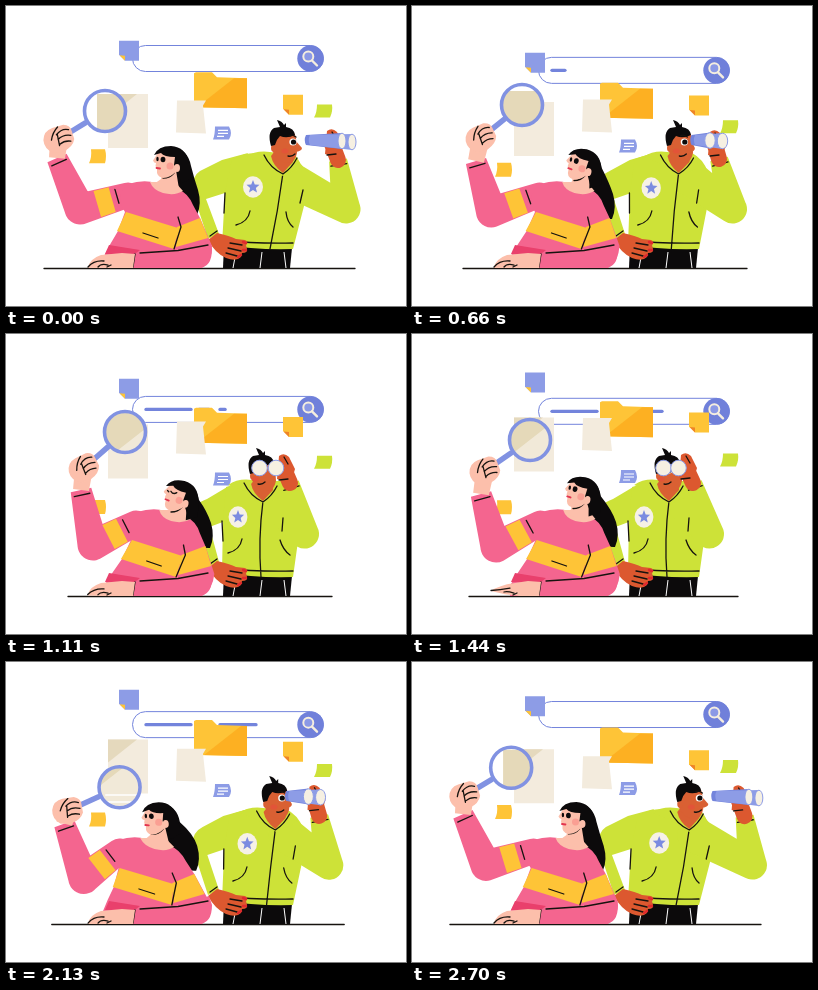
An HTML page for the animation above (2730 ms loop, 400 by 300 pixels).

```html
<!DOCTYPE html>
<html lang="en">
<head>
<meta charset="utf-8">
<title>Search party</title>
<style>
  html, body { margin: 0; width: 100%; height: 100%; overflow: hidden; background: #fff; }
  svg { display: block; width: 100vw; height: 100vh; }
  .ln { fill: none; stroke: #16130f; stroke-width: 1.3; stroke-linecap: round; stroke-linejoin: round; }
  .blue { fill: #8d9ce6; } .sun { fill: #fec437; } .lime { fill: #cde238; } .pink { fill: #f4658f; }
  .skin { fill: #fcbfab; } .tan { fill: #d96033; } .ink { fill: #0c0a0b; } .cream { fill: #f3ebdd; }
  .bar { stroke: #7384dc; fill: none; }
</style>
</head>
<body>
<svg viewBox="0 0 400 300">
  <defs><clipPath id="glass"><circle id="glassCut" r="20"/></clipPath></defs>

  <!-- floating sheets -->
  <g id="search">
    <rect class="bar" x="126.5" y="-13" width="191" height="26" rx="13"/>
    <g class="bar" stroke-width="3.300" stroke-linecap="round"><path id="dash0"/><path id="dash1"/><path id="dash2"/></g>
    <circle cx="304.5" r="13.2" fill="#7080da"/>
    <circle cx="302.3" cy="-2" r="5" fill="#8b99e6" stroke="#f5eedf" stroke-width="2"/>
    <path d="M306 2L311 7" stroke="#f5eedf" stroke-width="2.4" stroke-linecap="round"/>
  </g>
  <g id="blueNote">
    <path class="blue" d="M113 0H133V20H119L113 14Z"/>
    <path class="sun" d="M113.500 14.500L119 15V20Z"/>
  </g>
  <g id="folder">
    <path class="sun" d="M188 1L190 0H206L211 5L241 6V36L188 35Z"/>
    <path id="folderShade" fill="#fdb022"/>
  </g>
  <g id="sheet">
    <path class="cream" d="M102 0H142V54H102Z"/>
    <path fill="#e5d9bd" d="M102 0H131L102 23Z"/>
  </g>
  <g id="scrap"><path class="cream" d="M171 0H200L197 5L200 33L170 32Z"/></g>
  <g id="sunNote">
    <path class="sun" d="M277 0H297V20H283L277 14Z"/>
    <path fill="#ee8428" d="M277.500 14.500L283 15V20Z"/>
  </g>
  <g id="chat">
    <path class="blue" d="M209 0H223Q227 7 223 13H207Q209 8 209 0Z"/>
    <path d="M212 4H222M212 7H222M211 10H218" stroke="#fff" stroke-width="1.2"/>
  </g>
  <g id="tag"><path class="sun" d="M85 0H99Q101 7 99 14H83Q86 8 85 0Z"/></g>

  <path id="floor" class="ln"/>

  <!-- man -->
  <path class="ink" d="M218 239L286 242L284 262H217Z"/>
  <path d="M230 246L227 262M256 246L254 262M278 246L280 262" stroke="#fff" stroke-width="1"/>
  <path id="akimbo" class="lime"/>
  <path id="hoodie" class="lime"/>
  <path id="mArm" class="lime"/>
  <path id="mLines" class="ln"/>
  <g id="badge">
    <ellipse rx="10" ry="10.500" fill="#f6f1e6"/>
    <polygon id="star" fill="#7b8be0"/>
  </g>
  <g id="hood">
    <path class="lime" d="M240 151Q250 144 264 146L289 149Q295 156 295 162L277 170L255 157Z"/>
  </g>
  <path id="neck" class="tan"/>
  <path id="collar" class="ln"/>
  <g id="mHead">
    <path class="tan" d="M266 134Q266 122 277 122Q288 122 290 132L291 147Q289 157 282 157Q271 156 267 146Z"/>
    <path id="nose" class="tan"/>
    <ellipse class="tan" cx="268" cy="142" rx="3" ry="4"/>
    <path class="ink" d="M265 140Q261 126 268 122L274 121L271 114Q276 115 278 119L280 117L280 121Q288 122 289 129Q281 133 274 130Q270 134 269 139Z"/>
    <g id="mFace">
      <circle cx="287" cy="136" r="3.600" fill="#fff"/><circle class="ink" cx="287.500" cy="136" r="2.600"/>
      <path class="ln" d="M283 130Q286 128 290 131M282 150Q286 151 289 148"/>
      <ellipse cx="279" cy="145" rx="3.500" ry="2.500" fill="#e6503a" opacity=".7"/>
    </g>
  </g>
  <path id="mHand" fill="#dc582f"/>
  <path id="mFingers" class="ln" stroke-width="1"/>
  <g id="limeNote"><path class="lime" d="M311 0H326Q327 7 324 13H308Q311 8 311 0Z"/></g>
  <g>
    <path id="barrel1" fill="#7384dc"/><path id="barrel2" class="blue"/>
    <g fill="#f6f0e2" stroke="#8d9ce6"><ellipse id="lens1"/><ellipse id="lens2"/></g>
  </g>
  <g transform="translate(-2 -1)">
    <path fill="#dc582f" d="M204 235L213 228Q226 231 232 234L241 235Q245 237 242 240L243 244Q244 248 238 248L237 252Q232 257 222 253Q211 248 204 235Z"/>
    <path class="ln" d="M226 238L238 240M224 243L237 246M222 248L233 251"/>
    <path d="M239 237L242 238M239 245L242 245M234 252L237 250" stroke="#e02a2e" stroke-width="2.400" stroke-linecap="round"/>
  </g>

  <!-- woman -->
  <path id="hair" class="ink"/>
  <path id="wArm" class="pink"/>
  <path id="wBand" class="sun"/>
  <g id="wTorso">
    <path class="pink" d="M122 178Q138 173 150 177Q160 186 173 184Q182 187 187 199L194 212L206 240Q206 256 196 262H98V250Q104 238 112 225L119 206Q108 190 122 178Z"/>
    <path class="sun" d="M120 206L172 222L168 243L111 225ZM171 221L194 212L202 232L170 241Z"/>
    <path class="ln" d="M172 211L175 221L168 243M137 227L152 232"/>
    <path class="skin" d="M144 176Q147 184 157 187Q169 190 177 185L169 176Z"/>
  </g>
  <path fill="#e9406c" d="M103 239L134 244L129 248H99Z"/>
  <path class="pink" d="M203 234L206 243Q206 262 192 262H127L129 247L172 244Z"/>
  <path class="ln" d="M134 247L172 244.500L202 239M129 248L127 261"/>
  <path id="rest" class="skin"/>
  <path id="restLines" class="ln"/>
  <path id="wNeck" class="skin"/>
  <path id="wNeckLine" class="ln"/>
  <g id="wHead">
    <path class="skin" d="M152 146L150 150L147 154.500Q148 157 150 157L149.500 160L151 163Q150 171 157 172Q165 172 171 164L173 148L160 143Z"/>
    <circle cx="164" cy="160" r="3.500" fill="#f98a83" opacity=".6"/>
    <path class="ink" d="M148 149Q152 140 165 140Q180 141 183 157L186 172L175 178L173 166L168 159L169 151Q158 151 155 147Z"/>
    <ellipse class="skin" cx="171" cy="162" rx="3" ry="4"/>
    <g id="eyes"><ellipse class="ink" cx="157" cy="153.500" rx="2.400" ry="2.800"/><ellipse class="ink" cx="151.500" cy="153" rx="1.200" ry="2.200"/></g>
    <path id="lids" class="ln" d="M154 153Q157 156 160 153M150.500 153L152 154"/>
    <path d="M150.500 162L154 162.500" stroke="#e3344f" stroke-width="1.800" stroke-linecap="round"/>
  </g>

  <!-- magnifier -->
  <g clip-path="url(#glass)">
    <rect x="60" y="50" width="110" height="120" fill="#fff"/>
    <g id="zoom">
      <path fill="#f1e9d8" d="M0 0H78V110H0Z"/>
      <path fill="#e5d9b9" d="M0 0H78L0 61Z"/>
      <path d="M12 65H48M12 72H44M12 79H48" stroke="#fff" stroke-width="1.500"/>
    </g>
  </g>
  <circle id="rim" r="20.500" fill="none" stroke="#8192e2" stroke-width="3.600"/>
  <path id="handle" stroke="#8192e2" stroke-width="5.500" stroke-linecap="round"/>
  <path id="wWrist" class="skin"/>
  <g id="fist">
    <path class="skin" d="M-14 -7Q-9 -15 0 -13L11 -10Q17 -6 15 0L13 8Q8 14 -2 13L-12 9Q-18 1 -14 -7Z"/>
    <path class="ln" d="M0 -5Q8 -8 13 -3M-1 0Q6 -2 12 3M-2 5Q4 4 9 8M1 -5L-3 6M-7 -3Q-2 -9 5 -11"/>
  </g>
  <path id="wCuff" class="ln"/>
</svg>
<script>
const LOOP = 2730, STEP = 30;
const KEYS = [0, 660, 1110, 1440, 1860, 2370];
const $ = id => document.getElementById(id);
const set = (id, attrs) => { for (const a in attrs) $(id).setAttribute(a, attrs[a]); };
const path = (id, d) => $(id).setAttribute('d', d);
const place = (id, x, y, more = '') => $(id).setAttribute('transform', `translate(${x} ${y}) ${more}`);
const mix = (a, b, u) => [a[0] + (b[0] - a[0]) * u, a[1] + (b[1] - a[1]) * u];

// Smooth periodic curve through the values given at KEYS.
function key(t, ...v) {
  const n = KEYS.length;
  const time = i => KEYS[(i + n) % n] + LOOP * Math.floor(i / n);
  const val = i => v[(i + n) % n];
  let i = n - 1;
  while (KEYS[i] > t) i--;
  const h = time(i + 1) - time(i), u = (t - time(i)) / h;
  const slope = j => (val(j + 1) - val(j - 1)) / (time(j + 1) - time(j - 1)) * h;
  const a = val(i), b = val(i + 1), u2 = u * u, u3 = u2 * u;
  return a * (2 * u3 - 3 * u2 + 1) + slope(i) * (u3 - 2 * u2 + u)
    + b * (3 * u2 - 2 * u3) + slope(i + 1) * (u3 - u2);
}

function normal(a, b) {
  const dx = b[0] - a[0], dy = b[1] - a[1], l = Math.hypot(dx, dy) || 1;
  return [-dy / l, dx / l];
}
const off = (p, n, r) => [p[0] + n[0] * r, p[1] + n[1] * r];

// Tapered limb piece; the far end may be cut flat.
function taper(a, b, ra, rb, flat) {
  const n = normal(a, b);
  const end = flat ? 'L' : `A${rb} ${rb} 0 0 0 `;
  return `M${off(a, n, ra)}L${off(b, n, rb)}${end}${off(b, n, -rb)}L${off(a, n, -ra)}A${ra} ${ra} 0 0 0 ${off(a, n, ra)}Z`;
}
function across(a, b, u, r) {
  const n = normal(a, b), p = mix(a, b, u);
  return [off(p, n, r), off(p, n, -r)];
}

const FLOATS = [ // id, middle, swing, delay
  ['search', 65, 12.5, 682], ['blueNote', 37.5, 9.7, 120], ['folder', 67.5, 9.4, 60],
  ['sheet', 86.5, 9.5, -70], ['scrap', 89.5, 6.3, -400], ['sunNote', 84, 7, -320],
  ['limeNote', 109.5, 12.3, 485], ['chat', 128.7, 9.8, 440], ['tag', 155, 12, 600]
];
const DASHES = [[140, 185], [193, 203], [214, 250]];

function drawSheets(t) {
  for (const [id, mid, swing, delay] of FLOATS)
    place(id, 0, mid + swing * Math.sin((t - delay) / LOOP * 2 * Math.PI));
  const typed = 139 + (t - 565) * 0.147, erased = 139 + (t - 2210) * 0.237;
  DASHES.forEach(([from, to], i) => {
    const a = Math.max(from, erased), b = Math.min(to, typed);
    path('dash' + i, b > a ? `M${a} 0H${b}` : '');
  });
  const glint = key(t, 0, 0, 0, 2, 10, 3);
  path('folderShade', `M${228 + glint} 6H241V36L${191 + glint} 35Z`);
}

function drawMan(t) {
  const k = key(t, 0, .52, 1, 1, .78, .05);
  const hx = key(t, 0, -10, -21, -21, -16, -1);
  const E = [key(t, 340, 320.5, 298.5, 297.5, 305.5, 337.5), key(t, 203, 203, 200, 200, 202, 204)];
  const W = [key(t, 332, 307, 284, 281, 294, 329), key(t, 154, 153, 149, 149, 151, 156)];
  const H = [key(t, 326, 303, 278, 274, 288, 325), key(t, 138, 139, 135, 134, 137, 138)];
  const S = [283 - 7 * k, 173];
  const s = 7 * k;

  path('akimbo', `M242 147L${216 + s / 2} 154L${194 + s} 165Q186 170 186 184L202 233L213 228L${200 + s / 2} 193L222 186Z`);
  path('hoodie', `M${226 - 6 * k} 153Q240 146 252 147H280Q${294 - 5 * k} 153 ${300 - 8 * k} 166L${298 - 5 * k} 200L287 243Q250 244 216 239L${219 - 2 * k} 186Z`);
  path('mArm', taper(S, E, 18, 14.5) + taper(E, W, 14.5, 9, true));

  const [c1, c2] = across(W, E, .1, 8);
  const zx = 277 - 20 * k, zb = 264 - 9 * k;
  path('mLines', `M${zx} 167Q${zx - 5} 205 ${zb} 243`
    + `M${230 - 8 * k} 219Q${242 - 8 * k} 216 ${244 - 8 * k} 205`
    + `M${280 - 6 * k} 206Q${281 - 4 * k} 216 ${287 - 3 * k} 221`
    + `M${297 - 20 * k} 184L${294 - 18 * k} 197M217 234Q250 238 287 237`
    + `M${219 - 3 * k} 187L${218 - k} 207M204 230L211 225M${c1}L${c2}`);
  place('badge', 247 - 15 * k, 181 + 2 * k, `scale(${1 - .06 * k} 1.02)`);

  place('hood', hx * .85, 0);
  const nx = hx * .95;
  path('neck', `M${269 + nx} 145L${286 + nx} 148L${287 + nx} 156L${zx} 167Q${267 + nx} 160 ${265 + nx} 150Z`);
  path('collar', `M${258 + nx} 149Q${264 + nx} 162 ${zx} 168Q${286 + nx} 162 ${291 + nx} 152`);

  place('mHead', hx, 0);
  path('nose', `M289 134L${296 - 6 * k} 142Q${296 - 6 * k} 145 289 146Z`);
  place('mFace', -9 * k, 0);

  const [x, y] = H;
  path('mHand', taper(W, H, 8, 8)
    + `M${x - 7} ${y + 10}L${x + 7} ${y + 14}L${x + 11} ${y}L${x + 5} ${y - 12}Q${x} ${y - 17} ${x - 5} ${y - 13}Z`);
  path('mFingers', `M${x} ${y - 12}L${x + 4} ${y - 5}M${x - 5} ${y + 11}L${x + 4} ${y + 10}`);

  const P = [key(t, 301, 277, 258, 256, 260, 297), 134];
  const rx = key(t, 4, 5.2, 7.8, 7.8, 6.3, 4);
  const lenses = [
    [key(t, 336, 298, 253.5, 251.5, 268.5, 331), 135 - k],
    [key(t, 346, 310.5, 270, 266.5, 282, 342), 136 - 2 * k]
  ];
  lenses.forEach(([lx, ly], i) => {
    const px = P[0] + (i ? 3 : -1) * (1 - k) + (lx - P[0]) * k * k * k;
    path('barrel' + (i + 1), `M${px} ${P[1] - 5}L${lx} ${ly - 8}V${ly + 8}L${px} ${P[1] + 5}Q${px - 2.5} ${P[1]} ${px} ${P[1] - 5}Z`);
    set('lens' + (i + 1), { cx: lx, cy: ly, rx, ry: 7.8 });
  });
}

function drawWoman(t) {
  const lean = key(t, 0, 6, 9, 7, -8, -8);
  const hx = key(t, 0, 5, 8, 4, -10, -9), hy = key(t, 0, 2.5, 6, 2.5, 1, 0);
  const tilt = key(t, 0, 11, 13, 10, -2, -2);
  const tx = key(t, 0, 9, 13, 12, 1, -1), ty = key(t, 0, 4, 5, 4, 0, 0);

  path('hair', `M${166 + hx} ${141 + hy}Q${182 + hx} ${143 + hy} ${185 + hx} ${160 + hy}`
    + `Q${188 + tx} ${172 + ty} ${192 + tx} ${184 + ty}Q${196 + tx} ${198 + ty} ${191 + tx} ${209 + ty}`
    + `Q${183 + tx} ${210 + ty} ${178 + tx} ${202 + ty}L${166 + lean} 186L${168 + hx} ${160 + hy}Z`);

  // Lean from the waist, which stays put.
  $('wTorso').setAttribute('transform', `matrix(1 0 ${-lean / 84} 1 ${lean / 84 * 262} 0)`);
  const nx = 156 + hx;
  path('wNeck', `M${nx} ${166 + hy}L${170 + hx} ${164 + hy}L${173 + lean} 183Q${160 + lean} 189 ${148 + lean} 178L${nx - 1} ${173 + hy}Z`);
  path('wNeckLine', `M${157 + hx} ${172 + hy}Q${164 + hx} ${172 + hy} ${168 + hx} ${167 + hy}`);
  place('wHead', hx, hy, `rotate(${tilt} 163 165)`);
  const shut = t > 990 && t < 1230;
  set('eyes', { visibility: shut ? 'hidden' : 'visible' });
  set('lids', { visibility: shut ? 'visible' : 'hidden' });

  const reach = key(t, 0, 0, .1, 1, .1, 0), r = reach * 3;
  path('rest', `M${82 - r} ${262 - r * 1.7}Q${83 - r} ${253 + r * .6} 95 ${249 + r * .4}L116 247L129 248L127 262H${96 + 4 * r}L${90 + r} ${262 - r * .6}Z`);
  path('restLines', `M${82 - r} ${261 - r * 1.5}Q88 ${254 + r * .6} 98 ${255 - r * .3}M92 ${261 - r}Q95 257 102 259M101 261L105 259`);

  const S = [122 + lean * .9, 189];
  const E = [key(t, 74, 79.5, 87, 84, 79, 77), key(t, 203, 206, 211, 213, 217, 214)];
  const W = [key(t, 51, 64, 75, 69, 60, 57), key(t, 152, 155, 156, 160, 163, 159)];
  const H = [key(t, 53, 69, 78, 73, 64, 60), key(t, 133, 132, 134, 137, 148, 146)];
  const L = [key(t, 99, 110, 119, 118, 116, 110), key(t, 105, 99, 98, 106, 126, 120)];
  path('wArm', taper(S, E, 12.5, 15.5) + taper(E, W, 15.5, 10.5, true));
  const [a, b] = across(E, S, .36, 13.5), [c, d] = across(E, S, .67, 12.8);
  path('wBand', `M${a}L${c}L${d}L${b}Z`);
  const [p, q] = across(W, E, .09, 8), [e, f] = across(E, S, .78, 9);
  path('wCuff', `M${p}L${q}M${f}L${mix(f, e, .8)}`);
  path('wWrist', taper(H, W, 9, 8, true));

  place('fist', H[0], H[1], `rotate(${Math.atan2(L[1] - H[1], L[0] - H[0]) * 180 / Math.PI})`);
  const dist = Math.hypot(L[0] - H[0], L[1] - H[1]);
  path('handle', `M${H}L${mix(L, H, 23 / dist)}`);
  for (const id of ['rim', 'glassCut']) set(id, { cx: L[0], cy: L[1] });
  place('zoom', key(t, 91, 84, 84, 82, 84, 90), key(t, 88, 85, 77, 73, 60, 78));

  const right = Math.max(326, key(t, 349, 335, 326, 326, 326, 349));
  path('floor', `M${key(t, 38, 51, 62, 57, 48, 44)} 262.5H${Math.min(right, 349)}`);
}

set('star', {
  points: Array.from({ length: 10 }, (_, i) => {
    const r = i % 2 ? 3 : 6.8, a = i * Math.PI / 5 - Math.PI / 2;
    return [r * Math.cos(a), r * Math.sin(a)];
  }).join(' ')
});

const start = performance.now();
function frame() {
  const now = (performance.now() - start) % LOOP;
  const t = Math.floor(now / STEP) * STEP;
  drawSheets(t);
  drawMan(t);
  drawWoman(t);
  requestAnimationFrame(frame);
}
frame();
</script>
</body>
</html>
```
